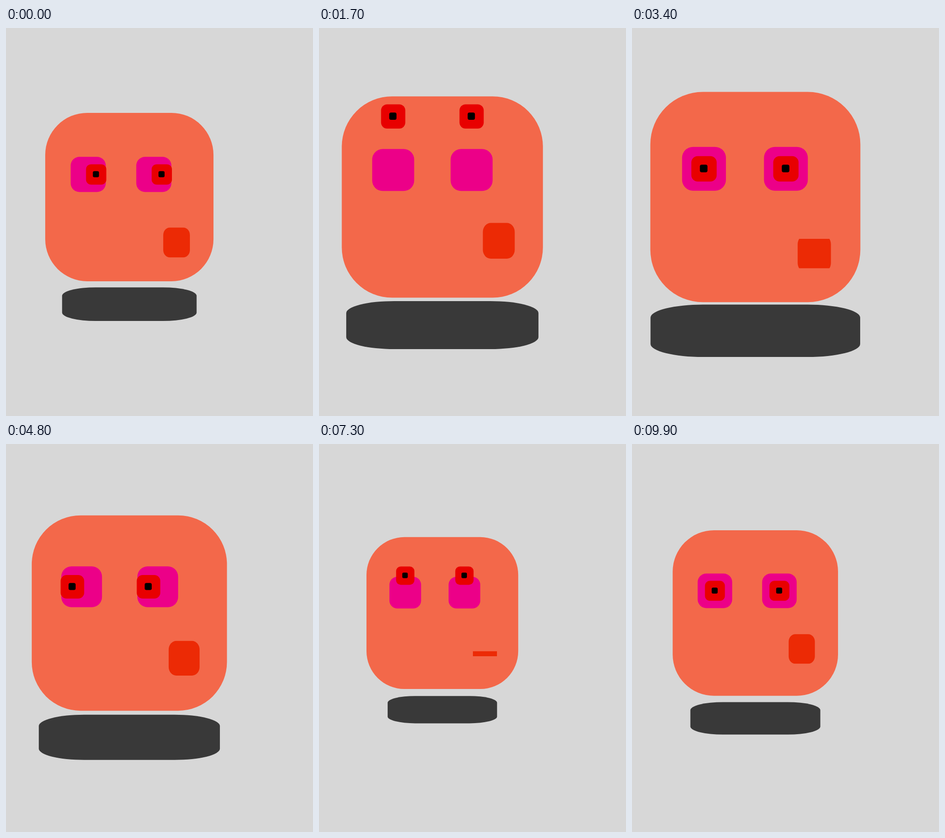
Recreate the animation shown at these times as an HTML page. Size 666 px wide and 841 px high, loop 10000 ms.

```html
<!DOCTYPE html>
<html lang="en">
<head>
<meta charset="utf-8">
<title>Floating face</title>
<style>
  html, body { margin: 0; width: 100%; height: 100%; overflow: hidden; background: #d7d7d7; }
  svg { display: block; width: 666px; height: 841px; }
</style>
</head>
<body>
<svg viewBox="0 0 666 841">
  <defs>
    <clipPath id="lips"><rect id="gap" x="-40" width="80"/></clipPath>
  </defs>
  <g id="face"></g>
</svg>
<script>
const LOOP = 10000, STEP = 100, LEAD = 6080;
const NS = 'http://www.w3.org/2000/svg';
const face = document.getElementById('face');
const gap = document.getElementById('gap');

function add(parent, tag, attrs = {}) {
  const el = document.createElementNS(NS, tag);
  for (const name in attrs) el.setAttribute(name, attrs[name]);
  return parent.appendChild(el);
}

// Centred box whose corner radii are a quarter of each side.
function box(parent, w, h, fill, x = 0, y = 0) {
  return add(parent, 'rect', { x: x - w / 2, y: y - h / 2, width: w, height: h, rx: w / 4, ry: h / 4, fill });
}

const shadow = add(face, 'g');
box(shadow, 456.5, 114, '#393939');
box(face, 456.5, 456.5, '#f3684a');

const irises = [-111.6, 66.4].map(x => {
  const eye = add(face, 'g', { transform: `translate(${x} -61.3)` });
  box(eye, 95.3, 95.3, '#ec0088');
  const iris = add(eye, 'g');
  box(iris, 55, 55, '#e80000');
  box(iris, 16.5, 16.5, '#000', -0.7, -0.7);
  return iris;
});

const mouth = add(face, 'g');
box(add(mouth, 'g', { 'clip-path': 'url(#lips)' }), 72.3, 81.2, '#ec2a05');

// cubic-bezier(.25, .1, .25, 1)
function ease(x) {
  let lo = 0, hi = 1;
  for (let i = 0; i < 24; i++) {
    const s = (lo + hi) / 2;
    if (0.75 * s - 0.75 * s * s + s ** 3 < x) lo = s; else hi = s;
  }
  return 0.3 * lo + 2.4 * lo * lo - 1.7 * lo ** 3;
}

// Keys are [progress, ...values]; each segment is eased on its own.
function track(keys, p, curve = ease) {
  const i = Math.max(1, keys.findIndex(k => k[0] >= p));
  const [a, b] = [keys[i - 1], keys[i]];
  const k = curve((p - a[0]) / (b[0] - a[0]));
  return a.slice(1).map((v, j) => v + (b[j + 1] - v) * k);
}

const HEAD = [[0, 1], [0.5, 0.7], [1, 1]];
const MOUTH = [[0, 0], [0.5, 24.7], [1, 0]];
const OPENING = [[0, 82], [0.295, 82], [0.33, 5], [0.34, 5], [0.37, 64], [0.395, 82], [1, 82]];
const GAZE = [
  [0, 21.6, 0], [0.1, 21.6, 0], [0.197, 0, 0], [0.33, 0, -126.5], [0.5, 0, 0],
  [0.7, 0, 0], [0.8, -21.6, 0], [0.9, -21.6, 0], [0.995, 21.6, 0], [1, 21.6, 0]
];

function draw(time) {
  const clock = Math.floor((time % LOOP) / STEP) * STEP + LEAD;
  const phase = period => (clock % period) / period;

  const [scale] = track(HEAD, phase(10000));
  face.setAttribute('transform', `translate(267.6 366.4) scale(${scale})`);
  shadow.setAttribute('transform', `translate(0 290.4) scale(${scale})`);

  const [x, y] = track(GAZE, phase(6000));
  for (const iris of irises) iris.setAttribute('transform', `translate(${x} ${y})`);

  const [drop] = track(MOUTH, phase(4000));
  mouth.setAttribute('transform', `translate(128.1 ${99.1 + drop})`);

  const [open] = track(OPENING, phase(4000), k => k);
  gap.setAttribute('y', -open / 2);
  gap.setAttribute('height', open);
}

function tick() {
  draw(performance.now());
  requestAnimationFrame(tick);
}
tick();
</script>
</body>
</html>
```
